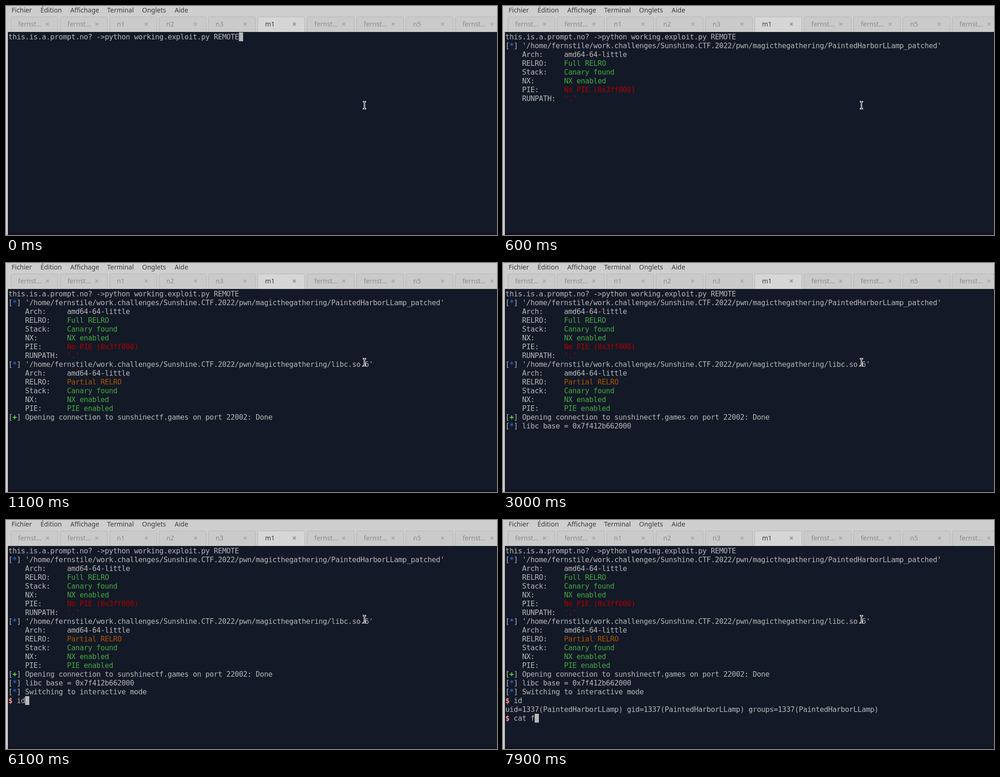
An HTML page with a canvas for the animation above (8000 ms loop, 1054 by 494 pixels).

```html
<!DOCTYPE html>
<html lang="fr">
<head>
<meta charset="utf-8">
<title>Terminal</title>
<style>
html, body { margin: 0; width: 100%; height: 100%; overflow: hidden; background: #cecece; }
canvas { display: block; }
</style>
</head>
<body>
<canvas id="stage" width="1054" height="494"></canvas>
<script>
const ctx = document.getElementById('stage').getContext('2d');
const LOOP = 8000, LEFT = 5, TOP = 57, CELL = 9, ROW = 19, ASCENT = 15;
const UI = '14px "Noto Sans", sans-serif';
const MONO = '15.55px "DejaVu Sans Mono", monospace';
const GREY = '#b7b7b7', GREEN = '#44aa44', RED = '#aa0000', ORANGE = '#aa5500';
const BLUE = '#295fcc', LIME = '#4ce64c', PINK = '#ff8787';

const MENU = [['Fichier', 12], ['Édition', 74], ['Affichage', 138],
  ['Terminal', 217], ['Onglets', 292], ['Aide', 362]];
const TABS = ['fernst...', 'fernst...', 'n1', 'n2', 'n3', 'm1', 'fernst...', 'fernst...', 'n5', 'fernst...'];
const ACTIVE = 5;

const USER = 'PaintedHarborLLamp';
const FOLDER = '/home/fernstile/work.challenges/Sunshine.CTF.2022/pwn/magicthegathering/';
const HOST = 'Opening connection to sunshinectf.games on port 22002';

// Every line is a list of [column, text, colour, bold] spans.
const plain = text => [[0, text, GREY]];
const log = (mark, color, text) => [[0, '[', GREY], [1, mark, color, true], [2, '] ' + text, GREY]];
const info = text => log('*', BLUE, text);
const field = (label, value, color) => [[4, label + ':', GREY], [14, value, color]];
const prompt = typed => [[0, '$', PINK, true], [2, typed, GREY]];

const command = plain('this.is.a.prompt.no? ->python working.exploit.py REMOTE');
const binary = [
  info(`'${FOLDER}${USER}_patched'`),
  field('Arch', 'amd64-64-little', GREY),
  field('RELRO', 'Full RELRO', GREEN),
  field('Stack', 'Canary found', GREEN),
  field('NX', 'NX enabled', GREEN),
  field('PIE', 'No PIE (0x3ff000)', RED),
  field('RUNPATH', "'.'", RED)
];
const library = [
  info(`'${FOLDER}libc.so.6'`),
  field('Arch', 'amd64-64-little', GREY),
  field('RELRO', 'Partial RELRO', ORANGE),
  field('Stack', 'Canary found', GREEN),
  field('NX', 'NX enabled', GREEN),
  field('PIE', 'PIE enabled', GREEN)
];
const identity = plain(`uid=1337(${USER}) gid=1337(${USER}) groups=1337(${USER})`);

// Keystrokes: the time at which each character appears.
const ID_KEYS = [6000, 6100];
const CAT_KEYS = [7200, 7300, 7600, 7700, 7900];
const typed = (text, keys, t) => text.slice(0, keys.filter(k => t >= k).length);

function screen(t) {
  const lines = [command];
  if (t < 400) return { lines, cursor: [55, 0] };
  if (t < 500) return { lines, cursor: [0, 1] };
  if (t >= 600) lines.push(...binary);
  if (t >= 700) lines.push(...library);
  if (t >= 1100) lines.push(log('+', LIME, HOST + ': Done'));
  else if (t >= 800) lines.push(log('┤┘┴'[Math.floor(t / 100) - 8], BLUE, HOST));
  if (t >= 3000) lines.push(info('libc base = 0x7f412b662000'));
  if (t < 5200) return { lines };

  lines.push(info('Switching to interactive mode'));
  let input = typed('id', ID_KEYS, t);
  lines.push(prompt(input));
  if (t >= 6500) {
    if (t >= 6800) lines.push(identity);
    input = typed('cat f', CAT_KEYS, t);
    lines.push(prompt(input));
  }
  return { lines, cursor: [2 + input.length, lines.length - 1] };
}

function rect(x, y, w, h, color) {
  ctx.fillStyle = color;
  ctx.fillRect(x, y, w, h);
}

function label(text, x, y, color) {
  ctx.font = UI;
  ctx.fillStyle = color;
  ctx.fillText(text, x, y);
}

// Terminal text sits on a grid of whole-pixel cells.
function drawSpan(row, [col, text, color, bold]) {
  ctx.font = (bold ? 'bold ' : '') + MONO;
  ctx.fillStyle = color;
  [...text].forEach((char, i) =>
    ctx.fillText(char, LEFT + (col + i) * CELL, TOP + row * ROW + ASCENT));
}

function strokeLines(lines, color, width) {
  ctx.beginPath();
  lines.forEach(([x1, y1, x2, y2]) => { ctx.moveTo(x1, y1); ctx.lineTo(x2, y2); });
  ctx.strokeStyle = color;
  ctx.lineWidth = width;
  ctx.stroke();
}

function drawTab(name, i) {
  const x = 10 + 106 * i, active = i === ACTIVE, cx = x + 79, cy = 39;
  ctx.beginPath();
  ctx.roundRect(x + 0.5, 23.5, 101, 36, [3, 3, 0, 0]);
  ctx.fillStyle = active ? '#d6d6d6' : '#cacaca';
  ctx.fill();
  ctx.strokeStyle = '#b5b5b5';
  ctx.lineWidth = 1;
  ctx.stroke();
  label(name, x + 16, 44, active ? '#3c3c3c' : '#8b8b8b');
  strokeLines([[cx - 3, cy - 3, cx + 3, cy + 3], [cx - 3, cy + 3, cx + 3, cy - 3]],
    active ? '#969696' : '#a9a9a9', 2);
}

function drawPointer() {
  const x = 769.5, top = 206.5, bottom = 221.5;
  const beam = [[x - 2, top, x + 2, top], [x, top, x, bottom], [x - 2, bottom, x + 2, bottom]];
  ctx.lineCap = 'square';
  strokeLines(beam, '#ffffff', 3);
  strokeLines(beam, '#10141c', 1);
  ctx.lineCap = 'butt';
}

function draw(t) {
  rect(0, 0, 1054, 494, '#cecece');
  MENU.forEach(([name, x]) => label(name, x, 14, '#3c3c3c'));
  TABS.forEach(drawTab);
  rect(4, 56, 1050, 438, '#131926');
  rect(4, 490, 1050, 4, '#120f1e');

  const { lines, cursor } = screen(t);
  lines.forEach((spans, row) => spans.forEach(span => drawSpan(row, span)));
  if (cursor) rect(LEFT + cursor[0] * CELL, TOP + cursor[1] * ROW, CELL, ROW, GREY);
  drawPointer();
}

const start = performance.now();
function tick() {
  draw((performance.now() - start) % LOOP);
  requestAnimationFrame(tick);
}
tick();
</script>
</body>
</html>
```
